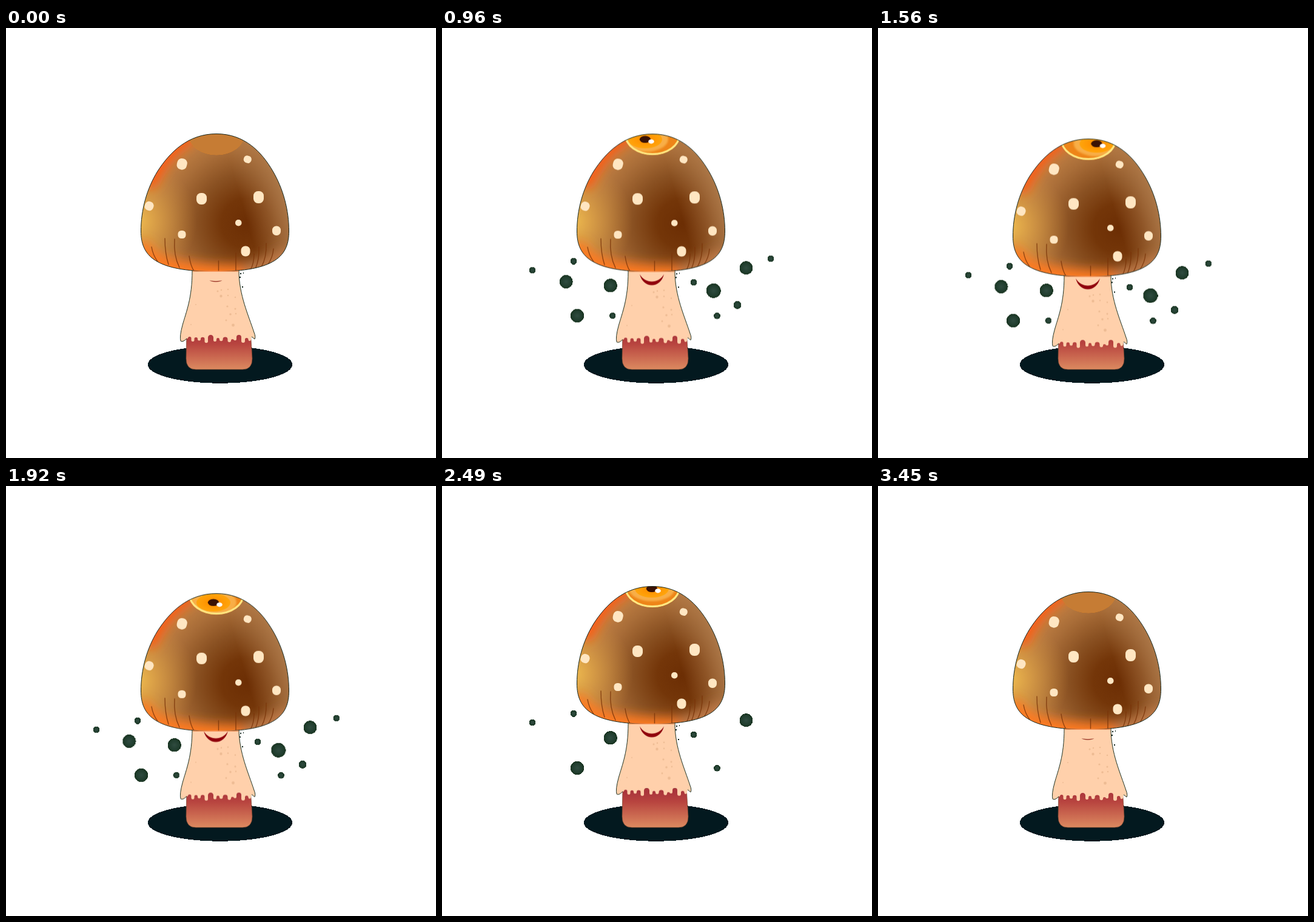
An HTML page for the animation above (3600 ms loop, 709 px wide and 709 px high).

```html
<!DOCTYPE html>
<html lang="en">
<head>
<meta charset="utf-8">
<title>Mushroom</title>
<style>
  html, body { margin: 0; width: 100%; height: 100%; overflow: hidden; background: #fff; }
  svg { display: block; width: 100%; height: 100%; }
  .crisp { shape-rendering: crispEdges; }
  .bob, .sway, .gaze, .lid, .smile, .spore {
    animation: 3600ms cubic-bezier(.37, 0, .63, 1) infinite;
  }
  .bob { animation-name: bob; }
  .sway { animation-name: sway; }
  .gaze { animation-name: gaze; }
  .lid { animation-name: lid; }
  .smile { animation-name: smile; }
  .spore { transform-box: fill-box; transform-origin: center; animation-name: spore; }
  .blink .spore { animation-name: blink; }

  @keyframes bob {
    0%, 24.17% { transform: none; }
    43.33% { transform: translateY(8.5px); }
    69.17% { transform: translateY(-9px); }
    86.67%, 100% { transform: none; }
  }
  @keyframes sway {
    0%, 21.67% { transform: none; }
    40% { transform: translateY(9px); }
    65.83% { transform: translateY(-9px); }
    84.17%, 100% { transform: none; }
  }
  @keyframes gaze {
    0%, 15% { transform: none; }
    26.67% { transform: translate(-12px, -2px); }
    43.33% { transform: translate(13.5px, -3px); }
    53.33% { transform: translate(-5px, 4px); }
    69.17% { transform: translate(-1px, -7px); }
    83.33%, 100% { transform: none; }
  }
  @keyframes lid {
    0%, .83% { transform: none; }
    15%, 82.5% { transform: translateY(-40px); }
    95%, 100% { transform: none; }
  }
  @keyframes smile {
    0%, .83% { d: path("M335.5 416C339 419.5 353 419.5 356.500 416C353 417.500 339 417.500 335.500 416Z"); fill: #a04030; }
    15%, 82.5% { d: path("M326 404.5C332 428.500 360 428.500 366 404.500C357 420.500 335 420.500 326 404.500Z"); fill: #90040c; }
    95%, 100% { d: path("M335.5 416C339 419.5 353 419.5 356.500 416C353 417.500 339 417.500 335.500 416Z"); fill: #a04030; }
  }
  @keyframes spore {
    0%, 20% { transform: scale(0); }
    24%, 70% { transform: scale(1); }
    74%, 100% { transform: scale(0); }
  }
  @keyframes blink {
    0%, 21% { transform: scale(0); }
    25% { transform: scale(1); }
    43%, 65% { transform: translateX(var(--dx)) scale(1); }
    67.5%, 70.5% { transform: translateX(var(--dx)) scale(0); }
    73%, 78% { transform: translateX(var(--dx)) scale(1); }
    82%, 100% { transform: translateX(var(--dx)) scale(0); }
  }
</style>
</head>
<body>
<svg viewBox="0 0 709 709">
  <defs>
    <radialGradient id="brown" gradientUnits="userSpaceOnUse" cx="396" cy="322" r="205">
      <stop offset="0" stop-color="#6c2e04"/>
      <stop offset=".2" stop-color="#743609"/>
      <stop offset=".4" stop-color="#8a5122"/>
      <stop offset=".6" stop-color="#a96d38"/>
      <stop offset=".75" stop-color="#be7e42"/>
      <stop offset="1" stop-color="#cf9444"/>
    </radialGradient>
    <linearGradient id="rim" gradientUnits="userSpaceOnUse" x1="392" y1="300" x2="468" y2="278">
      <stop offset="0" stop-color="#b48050" stop-opacity="0"/>
      <stop offset="1" stop-color="#b48050" stop-opacity=".9"/>
    </linearGradient>
    <radialGradient id="gold" gradientUnits="userSpaceOnUse" cx="215" cy="318" r="100">
      <stop offset="0" stop-color="#f0bd50"/>
      <stop offset=".3" stop-color="#e0a748" stop-opacity=".8"/>
      <stop offset="1" stop-color="#c88a3c" stop-opacity="0"/>
    </radialGradient>
    <linearGradient id="trunk" x1="0" y1="0" x2="0" y2="1">
      <stop offset=".1" stop-color="#aa353c"/>
      <stop offset=".35" stop-color="#b8443f"/>
      <stop offset="1" stop-color="#dc8a60"/>
    </linearGradient>
    <radialGradient id="dust">
      <stop offset="0" stop-color="#304c40"/>
      <stop offset=".65" stop-color="#223f30"/>
      <stop offset="1" stop-color="#18331f"/>
    </radialGradient>
    <radialGradient id="iris">
      <stop offset=".3" stop-color="#ff9200"/>
      <stop offset="1" stop-color="#ffa50c"/>
    </radialGradient>
    <filter id="soft" x="-30%" y="-40%" width="160%" height="180%"><feGaussianBlur stdDeviation="9"/></filter>
    <filter id="haze"><feGaussianBlur stdDeviation="1.5"/></filter>
    <path id="cap" d="M347 174.5C300 174.5 270 205 250 236C232 265 222.5 300 222.5 335C222.5 375 245 401.5 345 401.5C445 401.5 466.5 375 466.5 335C466.5 300 457 265 440 236C422 205 394 174.5 347 174.5Z"/>
    <clipPath id="inCap"><use href="#cap"/></clipPath>
    <clipPath id="inEye"><ellipse cx="347" cy="176" rx="46" ry="33.3"/></clipPath>
  </defs>

  <ellipse class="crisp" cx="353" cy="555" rx="119.3" ry="30.7" fill="#03191f"/>
  <path d="M298 498H403L406 545Q406 563 390 563H313Q297 563 297 545Z" fill="url(#trunk)" stroke="#7a4a30" stroke-width=".7"/>

  <g class="bob crisp" fill="url(#dust)">
    <circle class="spore" cx="149" cy="399" r="5.3"/>
    <circle class="spore" cx="217" cy="384.3" r="5.5"/>
    <circle class="spore" cx="277.7" cy="424.3" r="11.2"/>
    <circle class="spore" cx="223" cy="474" r="11.2"/>
    <circle class="spore" cx="415" cy="419" r="5.3"/>
    <circle class="spore" cx="453.5" cy="474.3" r="5.4"/>
    <circle class="spore" cx="501.5" cy="395.2" r="11"/>
    <g class="blink">
      <circle class="spore" cx="204.6" cy="418" r="11" style="--dx:-1.5px"/>
      <circle class="spore" cx="281.3" cy="474" r="5.2" style="--dx:-.3px"/>
      <circle class="spore" cx="447.7" cy="432.8" r="12" style="--dx:1.5px"/>
      <circle class="spore" cx="487" cy="456.3" r="6.5" style="--dx:2px"/>
      <circle class="spore" cx="542.2" cy="380" r="5.4" style="--dx:2.8px"/>
    </g>
    <g fill="#0c2018">
      <circle cx="387" cy="405" r="1.3"/>
      <circle cx="391.5" cy="404" r="1"/>
      <circle cx="386" cy="411" r="1.5"/>
      <circle cx="390" cy="427" r="1.2"/>
    </g>
  </g>

  <g class="sway">
    <path d="M307 380V400C307 446 297 468 291 490Q286 508 288 516Q291 519 298 512L300 511.700
      a2.75 2.75 0 0 1 5.5 0V514.5a2.5 2.5 0 0 0 5 0V512.700a2.75 2.75 0 0 1 5.5 0V513a2.5 2.5 0 0 0 5 0
      a3.25 3.25 0 0 1 6.5 0V516.500a2.75 2.75 0 0 0 5.5 0V510.500a4.5 4.5 0 0 1 9 0V514.500a2.5 2.5 0 0 0 5 0
      V513.500a2.5 2.5 0 0 1 5 0a2.75 2.75 0 0 0 5.5 0a4 4 0 0 1 8 0V515.300a2.75 2.75 0 0 0 5.5 0
      a2.25 2.25 0 0 1 4.5 0V513a2.25 2.25 0 0 0 4.5 0V510a4 4 0 0 1 8 0V516a3 3 0 0 0 6 0
      V513.700a2.75 2.75 0 0 1 5.5 0a2.25 2.25 0 0 0 4.500 0L405 509L410 513
      Q412 509 409 502C400 474 384 440 384 400V380Z" fill="#ffd0ab"/>
    <path d="M307 395V400C307 446 297 468 291 490Q286 508 288 516Q291 519 298 512
      M384 395V400C384 440 400 474 409 502Q412 509 410 513L405 509" fill="none" stroke="#1c3020" stroke-width="1"/>
    <g fill="#eebc94">
      <circle cx="354.5" cy="442" r="2.2"/>
      <circle cx="349" cy="434" r="1.5"/>
      <circle cx="355" cy="432" r="1.2"/>
      <circle cx="366" cy="431" r="1.3"/>
      <circle cx="378" cy="444" r="1.2"/>
      <circle cx="366" cy="441" r="1.2"/>
      <circle cx="365" cy="459" r="1.6"/>
      <circle cx="378" cy="463" r="1.5"/>
      <circle cx="370" cy="472" r="1.8"/>
      <circle cx="379" cy="471" r="1.2"/>
      <circle cx="363" cy="482" r="1.4"/>
      <circle cx="374.5" cy="490" r="2.4"/>
      <circle cx="305" cy="489" r="1"/>
      <circle cx="313" cy="456" r="1"/>
    </g>
    <path class="smile" d="M335.5 416C339 419.5 353 419.5 356.5 416C353 417.5 339 417.5 335.5 416Z" fill="#a04030"/>
  </g>

  <g class="bob">
    <g clip-path="url(#inCap)">
      <use href="#cap" fill="url(#brown)"/>
      <use href="#cap" fill="url(#rim)"/>
      <use href="#cap" fill="url(#gold)"/>
      <g fill="none" stroke-linecap="round" filter="url(#soft)">
        <path d="M345 408Q400 408 462 376" stroke="#c07a48" stroke-width="24"/>
        <path d="M300 179Q262 202 238 252" stroke="#ff5a14" stroke-width="24"/>
        <path d="M226 370Q245 406 378 408" stroke="#ff7a20" stroke-width="34"/>
      </g>
      <g fill="none" stroke="#7a3408" stroke-width="1.4" stroke-opacity=".8" stroke-linecap="round">
        <path d="M240 361Q242 374 250 385M262 347Q262 372 268 390M278 348Q276 375 286 395M302 376Q304 391 310 401M350.5 384V402M379 371V402M409 372Q409 388 403 399M417 361Q418 382 411 397M429 355Q430 378 421 394M441 364Q440 379 431 391"/>
      </g>
      <g fill="#ffe6c2">
        <rect x="282" y="215" width="16.5" height="18.5" rx="7.5" transform="rotate(14 290 224)"/>
        <rect x="392" y="210.5" width="13" height="12" rx="5.5" transform="rotate(20 398 216)"/>
        <rect x="314" y="272" width="17" height="19" rx="7.5"/>
        <rect x="408" y="269" width="17" height="20" rx="7.5"/>
        <rect x="229" y="286" width="14.5" height="15" rx="6.5" transform="rotate(20 236 293)"/>
        <rect x="378" y="316" width="10.5" height="10.5" rx="5"/>
        <rect x="283.5" y="334" width="13" height="13" rx="5.5"/>
        <rect x="439" y="326.5" width="14" height="15.5" rx="6.5"/>
        <rect x="387.5" y="359.5" width="15" height="17" rx="7"/>
      </g>
      <g clip-path="url(#inEye)">
        <ellipse cx="347" cy="176" rx="46" ry="34" fill="#ee8518"/>
        <g class="gaze">
          <ellipse cx="347" cy="185" rx="38" ry="21" fill="#f8ae46" filter="url(#haze)"/>
          <ellipse cx="347" cy="185.5" rx="28" ry="14.5" fill="url(#iris)"/>
          <ellipse cx="347" cy="185.300" rx="9.2" ry="5.8" fill="#3a1204"/>
          <ellipse cx="357" cy="188.800" rx="4.8" ry="3.6" fill="#fff"/>
        </g>
        <ellipse cx="347" cy="176" rx="44.5" ry="31.6" fill="none" stroke="#ffe782" stroke-width="3.4"/>
        <ellipse class="lid" cx="347" cy="176" rx="47" ry="35" fill="#c67c34"/>
      </g>
    </g>
    <use href="#cap" fill="none" stroke="#14241a" stroke-width="1"/>
    <path d="M308 401.200H383.5" stroke="#f6965c" stroke-width="1.6"/>
  </g>
</svg>
</body>
</html>
```
